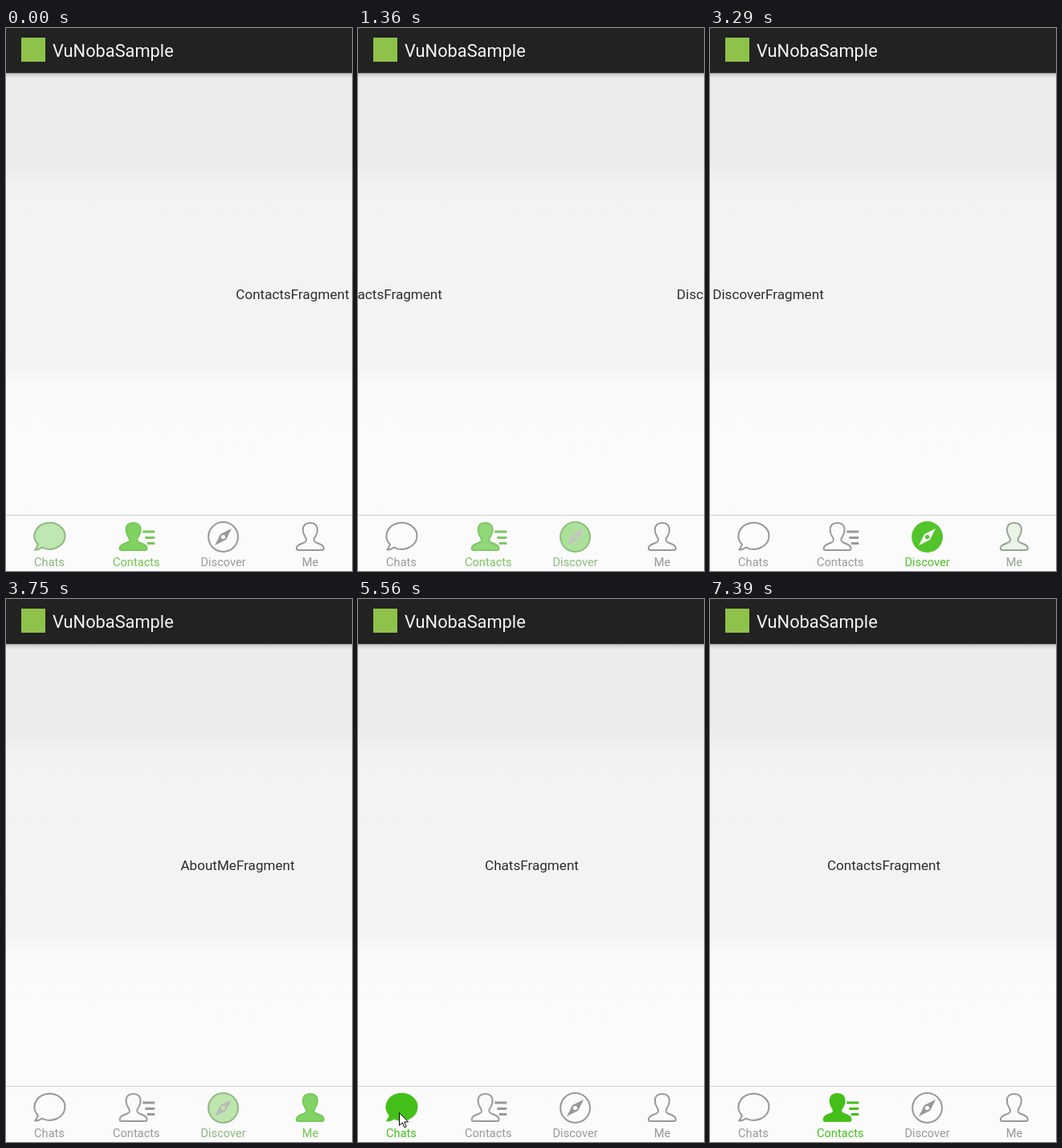
An HTML page that plays this animation: 431x677 px, repeating every 8.95 s.

```html
<!DOCTYPE html>
<html lang="en">
<head>
<meta charset="utf-8">
<title>Tab pager</title>
<style>
html, body { margin: 0; width: 100%; height: 100%; overflow: hidden; background: #fafafa; }
svg { display: block; font-family: Roboto, sans-serif; }
.page { font-size: 17.1px; fill: #2d2d2d; text-anchor: middle; }
.label { font-size: 14.6px; stroke: none; text-anchor: middle; }
</style>
</head>
<body>
<svg width="431" height="677" viewBox="0 0 431 677">
  <defs>
    <linearGradient id="back" gradientUnits="userSpaceOnUse" x1="0" y1="0" x2="0" y2="677">
      <stop offset=".25" stop-color="#ececec"/>
      <stop offset=".288" stop-color="#f2f2f2"/>
      <stop offset=".62" stop-color="#f4f4f4"/>
      <stop offset=".66" stop-color="#fafafa"/>
      <stop offset="1" stop-color="#fbfbfb"/>
    </linearGradient>
    <linearGradient id="shade" x2="0" y2="1">
      <stop offset="0" stop-opacity=".36"/>
      <stop offset=".3" stop-opacity=".1"/>
      <stop offset="1" stop-opacity="0"/>
    </linearGradient>
  </defs>
  <rect width="431" height="677" fill="url(#back)"/>
  <rect y="56" width="431" height="7" fill="url(#shade)"/>
  <rect width="431" height="56" fill="#222"/>
  <rect x="19" y="12" width="30" height="30" fill="#8fc24a"/>
  <text x="58" y="35.5" font-size="21.8" fill="#f5f5f5">VuNobaSample</text>
  <g id="pages"></g>
  <rect y="607" width="431" height="1" fill="#d2d2d2"/>
  <g id="tabs"></g>
  <path id="cursor" d="M.5.5V16.5L4.3 13 6.9 18.8 9.3 17.8 6.8 12H11.5Z" fill="#fff" stroke="#000"/>
</svg>
<script>
const GREY = '#999', GREEN = '#45c01a', PAGE = 432, LOOP = 8950;
const TICK = 140;      // moves advance in steps of about this many ms
const FADE_IN = 2.27;  // exponent of a drag that speeds up
const $ = id => document.getElementById(id);

function add(parent, tag, attrs, text = '') {
  const node = document.createElementNS('http://www.w3.org/2000/svg', tag);
  for (const key in attrs) node.setAttribute(key, attrs[key]);
  node.textContent = text;
  return parent.appendChild(node);
}

// Icons are drawn around their tab's centre line, with y from the stage top.
const bubble = 'M-17.5 650.5L-14 644A19 16.5 0 1 1 -9 647.6Q-13 650.3 -17.5 650.5Z';
const person = 'M0 617C5.5 617 9 620 9 626 9 631 7 633 5 636.5 4 639.5 5 640.5 8 641.8' +
  'C13 643.8 17 645 17 649 17 650.5 16 651 14.5 651H-14.5C-16 651 -17 650.5 -17 649' +
  'C-17 645 -13 643.8 -8 641.8 -5 640.5 -4 639.5 -5 636.5 -7 633 -9 631 -9 626 -9 620 -5.5 617 0 617Z';
const disc = r => `M${-r} 634.5a${r} ${r} 0 1 0 ${2 * r} 0a${r} ${r} 0 1 0 ${-2 * r} 0Z`;
const needle = 'M10.5 624L3.5 638 -10.5 645 -3.5 631Z' + disc(2.6);

function solid(g, on, d, x = 0) {
  add(g, 'path', { d, transform: `translate(${x})`, fill: on ? GREEN : 'none' });
}
function contact(g, on) {
  solid(g, on, person, -3.7);
  add(g, 'path', { d: 'M8 628H23M11 635.5H23M13.5 642.5H23', 'stroke-width': 3 });
}
function compass(g, on) {
  const fill = { 'fill-rule': 'evenodd', stroke: 'none' };
  if (on) return add(g, 'path', { d: disc(19.4) + needle, fill: GREEN, ...fill });
  add(g, 'path', { d: disc(18.4), fill: 'none' });
  add(g, 'path', { d: needle, fill: GREY, ...fill });
}

const tabs = [
  ['Chats', 'ChatsFragment', (g, on) => solid(g, on, bubble)],
  ['Contacts', 'ContactsFragment', contact],
  ['Discover', 'DiscoverFragment', compass],
  ['Me', 'AboutMeFragment', (g, on) => solid(g, on, person)],
].map(([label, title, draw], i) => {
  const [off, on] = [GREY, GREEN].map((color, active) => {
    const g = add($('tabs'), 'g', {
      transform: `translate(${54 + 108.3 * i})`, stroke: color, 'stroke-width': 2,
    });
    draw(g, active);
    add(g, 'text', { class: 'label', y: 670.5, fill: color }, label);
    return g;
  });
  return { off, on, page: add($('pages'), 'text', { class: 'page', y: 338 }, title) };
});

// Each move holds its end value until the next one begins.
const swipes = [
  { at: 0, from: .675 },
  { at: 270, from: 1 },
  { at: 810, span: 670, from: 1, to: 1.7, ease: FADE_IN },
  { at: 1950, from: 2 },
  { at: 2990, span: 890, from: 2, to: 3 },
  { at: 5560, from: 0 },
  { at: 6650, from: 1 },
];
const glides = [
  { at: 270, span: 420, from: [110, 400], to: [323, 363], until: 950 },
  { at: 1950, span: 590, from: [91, 400], to: [314, 386], until: 2990 },
  { at: 4180, span: 610, from: [131, 489], to: [51, 640] },
  { at: 5870, span: 150, from: [108, 637], to: [165, 639] },
  { at: 6650, span: 740, from: [165, 639], to: [345, 662], until: 7390 },
];

const current = (moves, time) => moves.findLast(move => move.at <= time);
const mix = (a, b, u) => a + (b - a) * u;

function progress({ at, span = 1 }, time) {
  const count = Math.max(1, Math.round(span / TICK));
  return Math.min(1, Math.floor((time - at) / span * count) / count);
}

function showPager(time) {
  const swipe = current(swipes, time);
  const { from, to = from, ease = 1 } = swipe;
  const u = progress(swipe, time);
  const pos = mix(from, to, u ** ease), tint = mix(from, to, u ** FADE_IN);
  tabs.forEach(({ off, on, page }, i) => {
    const level = Math.max(0, 1 - Math.abs(i - tint));
    on.setAttribute('opacity', level);
    off.setAttribute('opacity', 1 - level);
    page.setAttribute('x', 216.5 + PAGE * (i - pos));
  });
}

function showCursor(time) {
  const glide = current(glides, time);
  const visible = glide && time < (glide.until ?? LOOP);
  $('cursor').setAttribute('visibility', visible ? 'visible' : 'hidden');
  if (!visible) return;
  const u = progress(glide, time);
  const spot = glide.from.map((start, axis) => Math.round(mix(start, glide.to[axis], u)));
  $('cursor').setAttribute('transform', `translate(${spot})`);
}

const start = performance.now();
function frame() {
  const time = Math.max(0, performance.now() - start) % LOOP;
  showPager(time);
  showCursor(time);
  requestAnimationFrame(frame);
}
frame();
</script>
</body>
</html>
```
